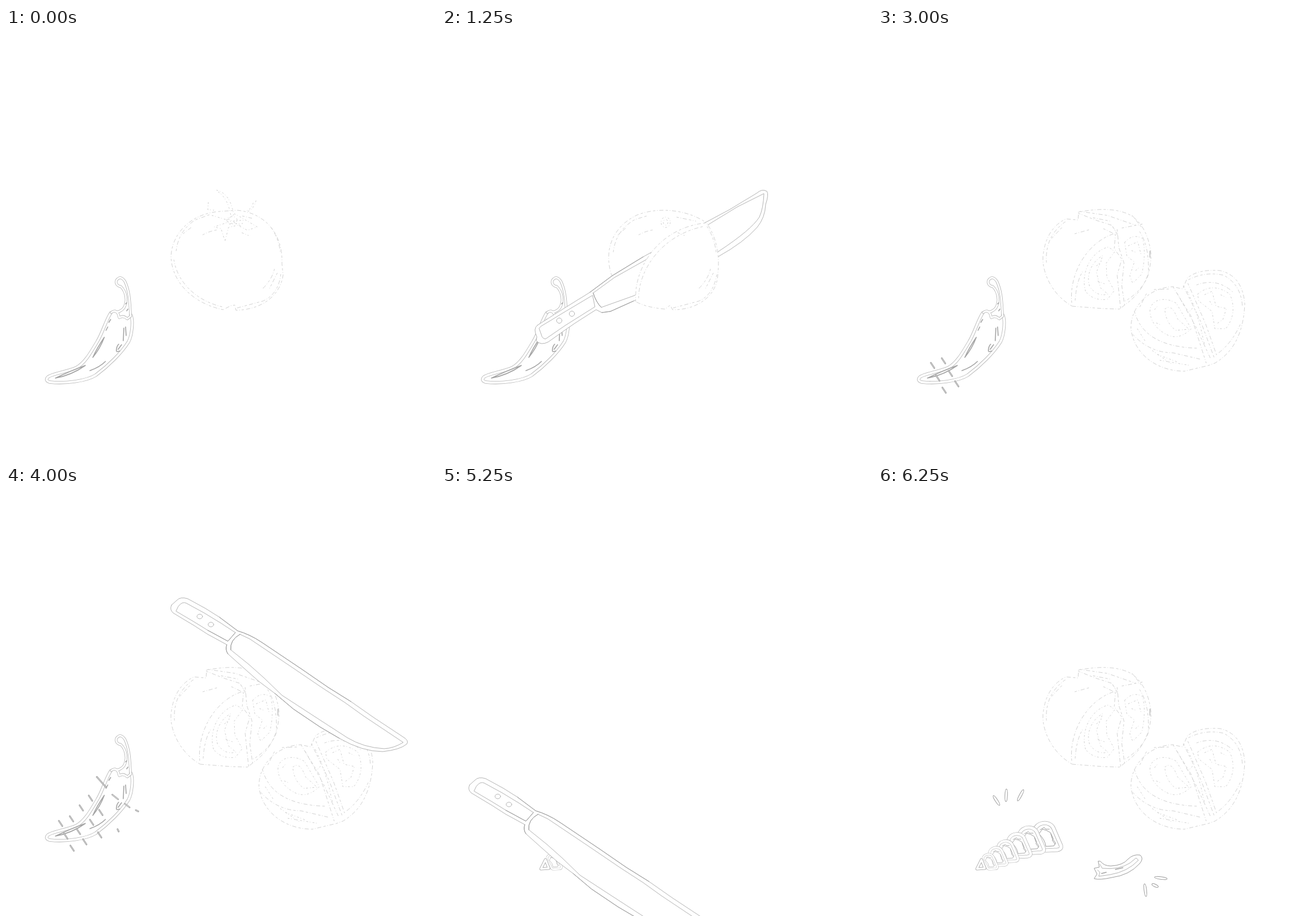
Animation, 748 px wide and 748 px high, one loop 6.5 s. Source, as an HTML page:

```html
<!DOCTYPE html>
<html lang="en">
<head>
<meta charset="utf-8">
<title>Chopping vegetables</title>
<style>
html, body { margin: 0; width: 100%; height: 100%; overflow: hidden; background: #fff; }
svg { display: block; width: 100vw; height: 100vh; }
path, ellipse { fill: none; stroke-linecap: round; stroke-linejoin: round; }
.solid { fill: #fff; }
.line { stroke: #b4b4b4; stroke-width: 1; }
.edge { stroke: #9c9c9c; stroke-width: 1; }
.mark { stroke: #a4a4a4; stroke-width: 1.6; }
.faint { stroke: #d2d2d2; stroke-width: 1; stroke-dasharray: 4 3 1 3 7 4; stroke-linecap: butt; }
.seed { stroke: #cfcfcf; stroke-width: 1; stroke-dasharray: 3 3 1 4; stroke-linecap: butt; }
</style>
</head>
<body>
<svg id="stage" viewBox="0 0 748 748"></svg>
<script>
const LOOP = 6500;
const stage = document.getElementById('stage');
const parts = [];

function add(parent, tag, attrs) {
  const el = document.createElementNS('http://www.w3.org/2000/svg', tag);
  for (const key in attrs) el.setAttribute(key, attrs[key]);
  return parent.appendChild(el);
}
const group = (parent = stage) => add(parent, 'g', {});
const draw = (parent, cls, d) => add(parent, 'path', { class: cls, d });
const oval = (parent, cls, cx, cy, rx, ry = rx, angle = 0) =>
  add(parent, 'ellipse', { class: cls, cx, cy, rx, ry, transform: `rotate(${angle} ${cx} ${cy})` });

// A white band with a thin grey edge on both sides.
function band(parent, d, width, color, fill = 'none') {
  add(parent, 'path', { d, style: `fill:${fill};stroke:${color};stroke-width:${width}` });
  add(parent, 'path', { d, style: `stroke:#fff;stroke-width:${width - 1.6}` });
}

// Each span is [from, to] in ms, optionally followed by a transform.
function during(el, ...spans) {
  parts.push({ el, spans });
  return el;
}

function dash(x1, y1, x2, y2, from, to) {
  const g = during(group(), [from, to]);
  band(g, `M${x1},${y1}L${x2},${y2}`, 4, '#b0b0b0');
}

// Chili pepper
const chili = during(group(), [0, 4750]);
band(chili, 'M182,496C174,508 168,530 159,545C146,567 136,584 122,591C106,598 82,601 73,607' +
  'Q67,613 76,616C104,619 140,614 156,604C179,587 201,565 213,546C219,535 222,508 217,499', 5.5, '#b4b4b4');
band(chili, 'M183,495Q190,489 195,497L197,504Q204,499 211,506L217,501C215,487 217,463 207,441' +
  'Q199,429 192,439Q190,448 200,450C209,459 212,475 205,487Q200,493 193,494', 4.5, '#b4b4b4');
draw(chili, 'mark', 'M86,609Q114,604 138,587Q113,596 86,609M146,596Q163,590 173,580' +
  'M151,573Q164,557 171,538Q158,557 151,573M174,526L177,520M179,512L182,507' +
  'M205,522L204,544M208,520L209,535M192,562Q192,554 196,550M195,559L201,551M193,563L198,562M208,480L210,478M210,492L212,489');

// Dotted cuts along the chili, one row every 250 ms
const cutRows = [
  [[95, 587], [104, 609], [115, 630]],
  [[114, 579], [126, 601], [137, 619]],
  [[131, 560], [149, 585], [163, 607]],
  [[147, 543], [165, 568], [195, 599]],
  [[166, 515], [190, 541], [211, 556], [228, 565]]
];
cutRows.forEach((row, i) => {
  const g = during(group(), [2750 + i * 250, 4750]);
  row.forEach(([x, y], j) => {
    const last = i === 4;
    const dx = last ? [8, 5, 4, 2][j] : i === 3 && j === 2 ? 1 : 3;
    const dy = last ? [9, 4, 3, 1][j] : i === 3 && j === 2 ? 2 : 4.5;
    const d = `M${x - dx},${y - dy}L${x + dx},${y + dy}`;
    add(g, 'path', { d, style: 'stroke:#999;stroke-width:2.8' });
    add(g, 'path', { d, style: 'stroke:#ddd;stroke-width:1.1' });
  });
});

// Whole tomato
const whole = during(group(), [0, 1250]);
draw(whole, 'solid faint', 'M378,490C327,480 288,443 287,397C289,356 323,322 373,319L402,317' +
  'C447,321 482,354 480,410L482,430C477,465 446,490 400,491L398,482L391,483L378,490');
draw(whole, 'faint', 'M376,485C330,474 298,442 292,403M296,388Q300,353 329,334L356,324M308,358L322,347' +
  'M342,360Q354,353 369,351M411,327L428,331M461,347Q474,365 477,389M478,428Q474,463 447,475L402,487' +
  'M467,419Q463,437 446,454M472,426L458,454M410,356L422,361');
draw(whole, 'seed', 'M366,282Q391,288 396,326M369,285Q386,296 391,326M352,303L351,316L362,317' +
  'M435,300Q431,315 421,319M430,304Q428,315 416,319M358,326L385,334L397,323L410,330L437,346L420,352' +
  'L403,343L387,347L381,371L374,349L362,346L386,338M384,337L416,334M388,341L412,340M386,332L408,344');
oval(whole, 'seed', 393, 334, 9, 6);

// Tomato being cut: back piece, knife, then front piece
const back = during(group(), [1250, 1500]);
draw(back, 'solid faint', 'M295,430C280,384 299,344 340,325C382,309 433,319 460,339L340,440Z');
draw(back, 'faint', 'M298,390Q302,352 336,333L356,327M306,360L322,346M342,360Q354,353 369,351M408,329L442,336');
oval(back, 'seed', 389, 338, 8, 9);
oval(back, 'seed', 389, 338, 4, 5);

const slicer = during(group(), [1000, 1250, 'translate(-8 -11) rotate(-16 165 535)'], [1250, 1500]);
draw(slicer, 'solid line', 'M166,517L215,486L257,460L296,431L350,398L457,339L500,316L548,287Q557,279 565,284' +
  'Q569,289 563,307Q562,330 548,347Q525,373 480,398L400,445L333,475L293,493L278,495L268,490L232,513' +
  'L216,524L185,546Q172,553 164,544L165,537Q158,523 166,517Z');
draw(slicer, 'line', 'M172,519Q216,492 262,465L266,485L215,517L180,541Q174,540 173,534L169,523Z' +
  'M263,461L300,434L355,403L455,347L514,311L560,288Q559,314 552,329Q538,351 482,388L400,438L333,466L277,486Q268,477 263,461');
draw(slicer, 'edge', 'M257,460L296,431L350,398M263,461Q268,477 277,486M278,495L293,493L333,475');
oval(slicer, 'line', 204, 509, 4.6);
oval(slicer, 'line', 226, 497, 4.6);

const front = during(group(), [1250, 1500]);
draw(front, 'solid faint', 'M337,476C333,412 382,346 460,339C479,365 483,399 480,425C480,468 441,491 401,490' +
  'L397,482L388,489Q355,486 337,476Z');
draw(front, 'faint', 'M342,470C342,422 381,360 456,345M461,345Q474,366 477,391M478,429Q472,464 447,475L402,487' +
  'M467,419Q463,437 446,454M472,426L458,454M410,356L422,361');

// Left half: outline and cut face
const left = during(group(), [1500, 4500], [5750, LOOP]);
draw(left, 'solid faint', 'M338,484C302,464 285,424 287,397Q292,349 327,332L348,334L349,320Q409,309 440,326' +
  'Q469,345 475,393C475,433 457,462 429,482L420,489L390,488Z');
draw(left, 'faint', 'M293,408Q290,362 326,337M302,366L322,345M342,358L367,351M337,478C332,426 365,371 413,357' +
  'M343,474Q345,440 357,422M348,322L378,334L406,343L416,356M351,319L399,326L448,343M374,330L404,336' +
  'M442,326L458,346M424,348L460,341M455,354Q473,381 470,430Q459,458 430,475');
draw(left, 'seed', 'M361,458C352,425 371,388 401,381L412,389L397,409L398,433L411,457L399,472Q374,475 361,458' +
  'M368,449C361,427 374,405 391,396L380,425L387,452L400,463Q380,468 368,449' +
  'M429,373Q443,357 460,366Q467,390 459,428L443,444L438,431L446,407L433,397L429,373' +
  'M435,379L452,372L458,396M380,414L389,405M382,440L394,445M441,387L450,391M448,422L455,416');
draw(left, 'edge', 'M473,388L473,399');
const leftSplit = during(group(), [1750, 4500], [5750, LOOP]);
draw(leftSplit, 'faint', 'M392,349L413,359L411,384L424,402L416,430L422,488M416,350L419,382L428,409L424,448L429,482' +
  'M408,345L418,363');

// Right half, first whole, then split
const half = during(group(), [1500, 1750]);
oval(half, 'solid faint', 529, 510, 90, 87);
oval(half, 'faint', 526, 498, 82, 61, 8);
oval(half, 'seed', 497, 500, 25, 36, -22);
oval(half, 'seed', 563, 496, 25, 35, -18);

const right = during(group(), [1750, 4500], [5750, LOOP]);
draw(right, 'solid faint', 'M513,450C474,451 439,483 440,523C445,567 485,597 533,597L575,587L586,583' +
  'C620,563 636,528 638,480Q634,431 595,422Q557,419 538,435L530,454Z');
draw(right, 'faint', 'M513,450L545,502L571,583M520,461L553,520L578,574M531,448L562,512L585,574M539,444L570,515L589,569' +
  'M446,493C457,533 491,555 555,557M443,533Q473,565 513,565L560,576M467,462L455,486M480,455L507,454' +
  'M540,438Q569,423 601,430Q632,446 634,486M554,447Q589,434 617,459M630,516Q615,549 590,567');
draw(right, 'seed', 'M473,493C473,474 497,465 519,479L545,523Q522,546 498,531Q475,517 473,493' +
  'M499,489Q511,478 521,506L541,524L518,526Q500,512 499,489M481,490L487,483M484,513L493,517' +
  'M556,463Q582,441 612,463Q626,496 605,523L586,523L581,493L558,475L556,463' +
  'M568,464L581,458L588,484L606,488L600,507L590,514M596,464L606,469M577,475L582,483' +
  'M477,561L510,584M486,568L521,581M490,578L543,587M451,523L465,545M538,458L550,484L542,493M553,493L561,520L568,551');

// Guide strokes
dash(436, 235, 408, 292, 500, 750);
dash(297, 572, 269, 629, 750, 1000);
dash(586, 600, 605, 634, 1750, 2000);
dash(294, 432, 323, 468, 2250, 2500);

// Chopped chili: the two tip pieces come first, the rest follows
const rest = during(group(), [5500, LOOP]);
const tip = during(group(), [4750, LOOP]);
const sliceShape = 'M-23,-8C-23,-27 4,-30 10,-16L23,14Q25,21 17,22L-3,23Q-9,22 -11,14Z';
const sliceInside = 'M-15,-6L-9,-14L-2,-12L5,-8L8,2L14,10L11,15L-3,16Q-4,5 -15,-6';
function slice(parent, x, y, size) {
  const g = add(parent, 'g', { transform: `translate(${x} ${y}) scale(${size})` });
  band(g, sliceShape, 7, '#b0b0b0', '#fff');
  draw(g, 'edge', sliceInside + 'M-13,-13L-6,-17L-3,-14L3,-14M6,-6L10,3L8,5L13,12');
}
slice(rest, 295, 611, 1);
slice(rest, 267, 617, .93);
slice(rest, 246, 626, .84);
slice(rest, 226, 636, .75);
slice(rest, 209, 645, .66);
slice(tip, 195, 654, .55);
band(tip, 'M172,666L180,650L186,665Z', 5, '#a0a0a0', '#fff');

draw(rest, 'solid edge', 'M387,653Q393,661 405,661Q426,660 435,649Q444,640 456,642Q463,648 455,657' +
  'Q437,677 407,681Q385,686 376,683L381,675L376,665L385,663L383,653Z');
draw(rest, 'line', 'M386,658L390,665Q419,668 438,656L449,647L453,651Q434,671 404,676L384,679L386,672L382,668');
draw(rest, 'mark', 'M413,667L426,664M389,674L397,672');
const sparks = [[206, 547, 10, 57], [223, 538, 11, 92], [248, 538, 11, -62], [465, 703, 11, 83], [482, 695, 6, 25], [492, 682, 11, 7]];
for (const [x, y, length, angle] of sparks) oval(rest, 'edge', x, y, length, 2.2, angle);

// Large knife, stepping down to the chili and back
const at = (x, y) => `translate(${x} ${y})`;
const steps = [at(0, 0), at(-32, 118), at(-95, 232), at(-240, 313), at(-384, 394)];
const order = [0, 1, 2, 3, 4, 3, 2, 1, 0];
const knife = during(group(), [1750, 2000],
  ...order.map((step, i) => [4000 + i * 250, 4250 + i * 250, steps[step]]));
draw(knife, 'solid line', 'M288,207L297,199Q303,192 316,196L347,213L371,228L403,252Q424,258 445,272L515,319' +
  'L560,350L600,375L640,403L690,436Q702,443 697,449Q685,459 655,462Q620,462 580,439L546,419L500,388' +
  'L468,361L440,340L414,317L386,292Q381,285 384,276L351,258L326,242L291,221Q284,215 288,207Z');
draw(knife, 'line', 'M300,209Q307,200 314,204L345,221L373,238L399,255L386,270L351,251L325,235L296,218Z' +
  'M407,258L424,266L497,315L550,351L590,377L622,400L691,446Q675,456 658,457Q622,455 594,438L543,405' +
  'L480,364L449,334L422,310L391,285Q389,268 407,258Z');
draw(knife, 'edge', 'M371,228L403,252Q424,258 445,272L515,319L560,350L600,375M399,255L386,270L351,251' +
  'M384,276Q381,285 386,292M391,285Q389,268 407,258M468,361L500,388L546,419L580,439');
oval(knife, 'line', 337, 227, 4.8, 4);
oval(knife, 'line', 356.5, 241, 4.8, 4);

function frame() {
  const t = performance.now() % LOOP;
  for (const { el, spans } of parts) {
    const span = spans.find(([from, to]) => t >= from && t < to);
    el.style.display = span ? '' : 'none';
    if (span) el.setAttribute('transform', span[2] || '');
  }
  requestAnimationFrame(frame);
}
frame();
</script>
</body>
</html>
```
